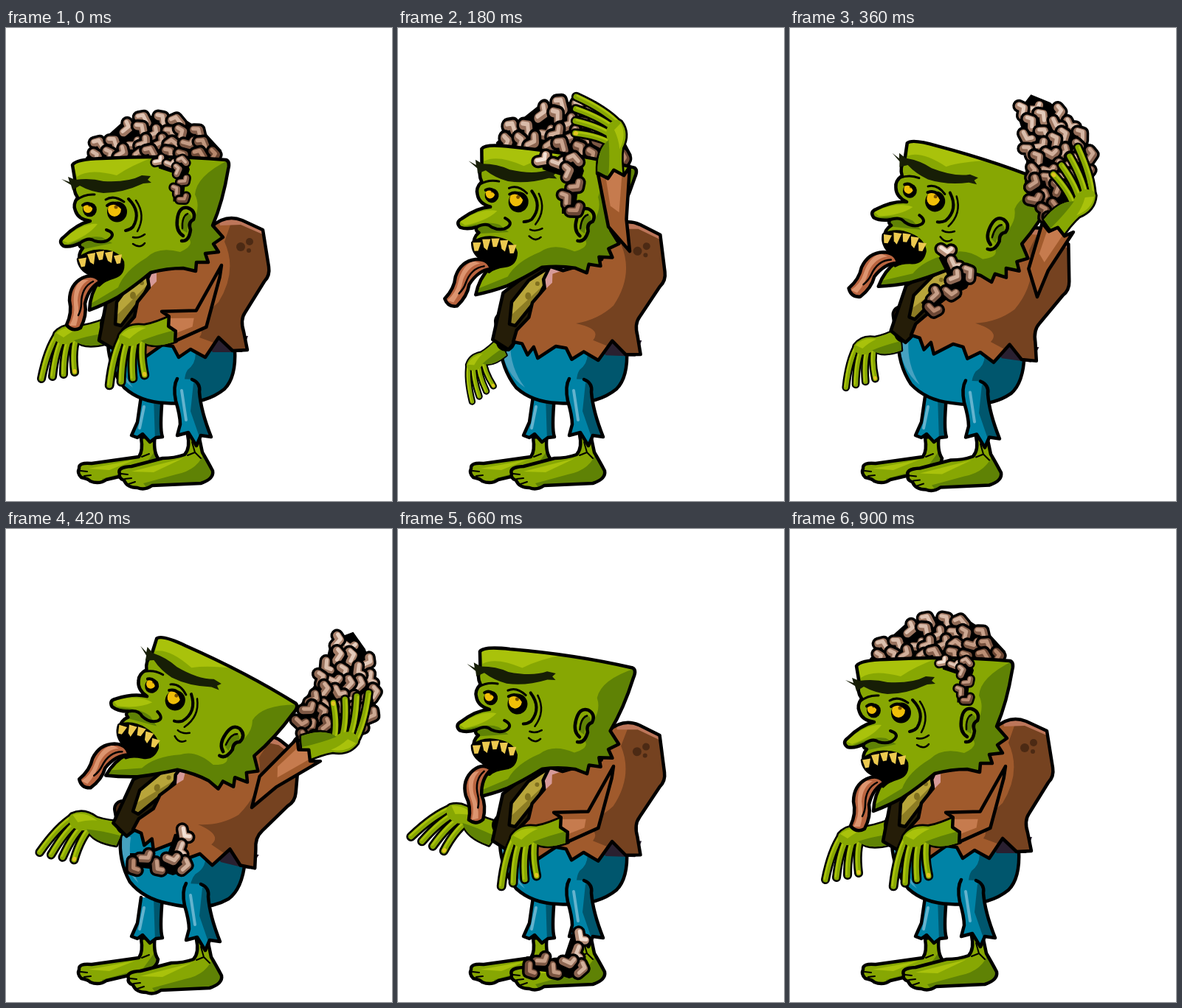
An HTML page with a canvas that plays this animation: 523x642 px, repeating every 960 ms.

```html
<!DOCTYPE html>
<html lang="en">
<head>
<meta charset="utf-8">
<title>Zombie</title>
<style>
html, body { margin: 0; width: 100%; height: 100%; overflow: hidden; background: #fff; }
canvas { display: block; }
</style>
</head>
<body>
<canvas id="stage" width="523" height="642"></canvas>
<script>
const c = document.getElementById('stage').getContext('2d');
const STEP = 60, POSES = 16;
const INK = '#000', SKIN = '#87a703', LIGHT = '#a9c20b', SHADE = '#5f8205';
const BROWN = '#a05a2c', DARK_BROWN = '#754220', BLUE = '#0083a6', DARK_BLUE = '#00566d';

const mix = (a, b, t) => a + (b - a) * t;
const mixPoint = (p, q, t) => p.map((v, i) => mix(v, q[i], t));

// Smooth rise from 0 to 1 between two poses.
function ramp(t, from, to) {
  const f = Math.min(1, Math.max(0, (t - from) / (to - from)));
  return f * f * (3 - 2 * f);
}

function place([x, y, deg = 0, scale = 1], px, py, draw) {
  c.save();
  c.translate(x, y);
  c.rotate(deg * Math.PI / 180);
  c.scale(scale, scale);
  c.translate(-px, -py);
  draw();
  c.restore();
}

function fill(d, color) {
  c.fillStyle = color;
  c.fill(new Path2D(d));
}

function line(d, width = 3, color = INK) {
  c.lineWidth = width;
  c.strokeStyle = color;
  c.stroke(new Path2D(d));
}

function dot(x, y, rx, ry, color) {
  c.fillStyle = color;
  c.beginPath();
  c.ellipse(x, y, rx, ry, 0, 0, 7);
  c.fill();
}

function part(d, color, ...shades) {
  fill(d, color);
  c.save();
  c.clip(new Path2D(d));
  for (const [tone, area] of shades) fill(area, tone);
  c.restore();
  line(d, 4.5);
}

// Brain tissue: jittered folds that fill a silhouette.
function makeBrain(d, [left, top, right, bottom], seed) {
  const path = new Path2D(d), folds = [];
  const rnd = () => (seed = (seed * 16807) % 2147483647) / 2147483647;
  for (let y = top, row = 0; y <= bottom; y += 16, row++) {
    for (let x = left + (row % 2) * 10; x <= right; x += 20) {
      const fx = x + rnd() * 8 - 4, fy = y + rnd() * 8 - 4, angle = rnd() * 3.1;
      const depth = (fx - left) / (right - left) * .6 + (fy - top) / (bottom - top) * .4;
      if (c.isPointInPath(path, fx, fy)) folds.push({ fx, fy, angle, depth });
    }
  }
  return { path, folds };
}

function drawBrain({ path, folds }) {
  const tone = (from, to, t) => `rgb(${mixPoint(from, to, t)})`;
  c.fillStyle = INK;
  c.fill(path);
  const fold = 'M-7 2L-2 -3L7 2';
  for (const { fx, fy, angle, depth } of folds) {
    place([fx, fy, angle * 57], 0, 0, () => {
      line(fold, 18);
      line(fold, 11, tone([178, 138, 116], [98, 62, 44], depth));
    });
    place([fx - 1, fy - 1.5, angle * 57], 0, 0, () =>
      line(fold, 5, tone([238, 218, 205], [176, 126, 98], depth)));
  }
}

const pile = makeBrain('M108 176L126 156L155 130L195 119L238 121L270 142L292 166L292 184L110 184Z', [110, 124, 294, 182], 41);
const chunk = makeBrain('M158 66L185 57L240 57L282 74L288 110L295 182L268 180L230 162L200 122L160 98Z', [162, 62, 296, 182], 77);
const scrap = makeBrain('M-46 -10L6 -10L12 8L4 32L0 66L-18 66L-18 40L-8 18L-44 6Z', [-40, -5, 10, 62], 9);

function hand() {
  const palm = 'M6 -13Q-18 -4 -32 -3Q-52 -8 -64 6Q-68 14 -58 20Q-46 24 -36 16Q-24 28 6 20Z';
  line(palm, 5);
  for (let i = 0; i < 4; i++) {
    const root = -60 + i * 9, tip = -82 + i * 15;
    const finger = `M${root} 8Q${root - 14 + i * 2} 28 ${tip} ${68 - i * 3}`;
    line(finger, 12);
    line(finger, 7, SKIN);
    place([-1.5, -1], 0, 0, () => line(finger, 2.5, LIGHT));
  }
  fill(palm, SKIN);
  fill('M6 6Q-20 10 -38 16Q-24 28 6 20Z', SHADE);
  fill('M-62 6Q-50 -5 -30 0Q-42 4 -52 12Z', LIGHT);
  dot(-37, 58, 2.5, 3, '#e3c422');
}

function toes(x, y, count) {
  for (let i = 0; i < count; i++) line(`M${x + i * 5} ${y + i * 7}l9 ${1 - i * 2}`, 2);
}

function backLeg() {
  part('M183 556Q186 574 180 582L116 591Q98 589 99 598Q96 604 102 610Q112 612 114 615Q126 620 136 613L166 606Q204 602 206 584Q199 574 202 552Z', SKIN,
    [LIGHT, 'M175 586L112 598L140 600Z'], [SHADE, 'M205 570L186 596L130 612L140 624L212 605Z']);
  toes(101, 601, 2);
  line('M184 582L194 578', 2);
  part('M183 500L178 535L170 553L178 556L185 551L195 562L203 556L212 555Q208 545 212 500', BLUE,
    [DARK_BLUE, 'M200 500L216 500L216 562L202 560Z']);
  line('M187 514L181 543', 4, '#63b3ce');
}

function frontLeg() {
  part('M246 552Q250 570 242 579Q228 584 212 584L170 595Q150 596 154 605Q152 611 160 614Q164 624 178 624Q188 628 198 621L264 618Q282 612 280 601Q272 586 266 576L261 552Z', SKIN,
    [LIGHT, 'M240 584L170 602L200 603Z'], [SHADE, 'M270 572Q262 600 230 606L186 618L200 636L290 620Z']);
  toes(156, 605, 3);
  line('M246 580L256 576L264 584M256 576L252 562', 2);
  part('M232 476Q226 486 230 506Q236 526 236 538L232 553L247 549L258 567L264 553L278 555Q264 520 262 494Q264 482 252 477', BLUE,
    [DARK_BLUE, 'M254 482L250 520L262 555L284 560L264 480Z']);
  line('M238 492L244 532', 4, '#63b3ce');
}

function pelvis() {
  part('M138 428L166 396L300 420L310 436Q312 474 296 490Q268 513 216 509Q182 508 160 488Q140 462 138 428Z', BLUE,
    [DARK_BLUE, 'M254 430Q262 452 246 464Q236 480 250 515L330 500L320 425Z'],
    ['#46a1c0', 'M140 428L152 428Q152 462 172 488Q145 470 138 428Z']);
}

function torso() {
  fill('M262 420L328 418L320 440L280 440Z', '#2a2030');
  part('M138 360L196 312L216 326L176 400L148 437L126 424Z', '#251d08');
  part('M198 324L172 342L150 372L148 402L156 404L186 364L204 326Z', '#b8a53a',
    ['#8c7c24', 'M150 390L190 350L204 326L200 380L150 410Z']);
  dot(172, 363, 4, 5, '#81711f');
  dot(184, 346, 3, 3, '#81711f');
  part('M200 322L218 327L270 310L278 270Q298 252 320 261L348 274L356 324Q358 336 350 344L324 386Q317 396 322 412L327 437L307 438L288 420L270 447L250 436L234 447L226 432L212 430L188 447L182 432L174 443L166 428L154 426L158 410L174 392L178 372L194 352L192 340Z', BROWN,
    [DARK_BROWN, 'M310 250L296 290Q314 330 288 372Q268 392 238 398Q274 404 262 420L330 445L375 340L350 260Z'],
    ['#bd765a', 'M288 258L320 260L350 275L350 281L318 267L290 268Z'],
    ['#d69a98', 'M196 352L194 338L200 320L220 326L204 332L204 344Z']);
  for (const [x, y, r] of [[318, 297, 6], [330, 290, 5], [329, 302, 3]]) dot(x, y, r, r, '#4c2a14');
}

function eye(x, y, r) {
  dot(x + r * .35, y + r * .35, r * 1.35, r * 1.4, INK);
  dot(x, y, r * .9, r, '#f0be08');
  dot(x + 2, y - 3, r * .25, r * .25, '#7a5200');
  line(`M${x - r} ${y - r * .5}Q${x} ${y - r * 1.3} ${x + r} ${y - r * .2}`, 4);
}

function face(tongueTurn) {
  part('M90 186Q94 178 130 177Q220 172 298 179Q304 181 301 192Q294 235 280 268L294 284L281 293L288 304L270 306L274 318L258 318L257 330L240 326Q218 326 196 332Q172 352 152 365Q134 375 113 383Q114 360 126 344L100 320Q97 306 104 299Q98 297 100 292Q88 298 78 296Q70 290 78 284Q96 266 114 262Q98 260 94 248Q90 240 97 230Q90 220 94 210Z', SKIN,
    [LIGHT, 'M90 180L204 174Q170 186 150 200Q112 190 96 202ZM76 288Q104 264 124 266Q112 282 84 292Z'],
    [SHADE, 'M304 178Q258 200 256 226Q268 250 240 280Q262 292 236 304Q206 296 190 312Q160 330 152 352L112 376L120 390L300 335ZM80 296Q112 280 130 284L144 292L106 300Z']);
  fill('M75 205L86 209L84 202L94 206Q114 203 132 208Q165 210 184 200L196 201L192 206L197 210L186 211Q158 224 132 224Q114 222 100 214L90 220L88 213Z', '#171e06');
  eye(111, 244, 7);
  eye(147, 246, 10);
  line('M95 234Q106 225 120 226M135 233Q146 226 160 236', 3);
  line('M166 232Q184 250 172 270Q168 274 162 275', 4);
  line('M176 234Q190 254 178 276M172 284Q180 286 188 280M172 293Q182 300 188 292', 2.5);
  line('M100 292Q112 283 120 289Q134 293 142 285Q148 278 136 274', 4);
  part('M98 314Q112 301 132 303Q152 304 158 318Q160 334 146 338Q132 342 126 349Q122 336 114 334Q100 328 98 314Z', INK);
  for (let i = 0; i < 5; i++) {
    const x = 104 + i * 12, y = 302 + (i - 2.3) ** 2 * 1.8;
    fill(`M${x - 6} ${y + 2}L${x + 5} ${y}L${x + 3} ${y + 12 + i % 2 * 4}L${x - 2} ${y + 13}Z`, '#ecc94f');
  }
  part('M240 282Q230 276 232 260Q234 242 246 244Q258 248 254 260Q246 264 250 274Q248 290 238 289', SKIN,
    [SHADE, 'M242 252Q252 250 252 260Q244 268 246 278L238 274Z']);
  line('M239 272Q238 256 246 252', 2.5);
  place([124, 344, tongueTurn], 124, 344, () => {
    part('M128 344Q120 332 104 339Q86 348 86 370Q90 386 82 403Q90 413 101 407Q110 390 107 374Q112 352 128 344Z', '#b9643f',
      ['#dd9570', 'M102 342Q90 352 92 376Q94 390 86 404L95 404Q100 388 97 370Q98 350 112 342Z']);
    line('M118 344Q102 352 102 374Q102 382 98 390', 2.5);
  });
}

// Torn sleeve from shoulder over elbow to a ragged cuff.
function sleeve(shoulder, elbow, wrist) {
  const dx = wrist[0] - elbow[0], dy = wrist[1] - elbow[1], length = Math.hypot(dx, dy);
  const at = (t, side) => [elbow[0] + dx * t - dy / length * side, elbow[1] + dy * t + dx / length * side];
  const cuff = [22, 12, 0, -10, -22].map((side, i) => at(i % 2 ? .94 : 1.03, side));
  const back = at(.35, -22);
  const outline = 'M' + [shoulder, at(.4, 4), ...cuff, back, mixPoint(shoulder, elbow, .3)].join('L') + 'Z';
  part(outline, BROWN, ['#c67b4e', `M${at(.5, -4)}L${at(1.1, 14)}L${at(1.1, -12)}L${at(.6, -14)}Z`]);
}

function draw(pose) {
  const rise = ramp(pose, 0, 3) - ramp(pose, 9, 11);
  const swing = ramp(pose, 5, 7) - ramp(pose, 7, 9);
  const lean = ramp(pose, 5, 7) - ramp(pose, 9, 11);
  const lift = ramp(pose, 0, 3) - ramp(pose, 10, 15);
  const drop = ramp(pose, 0, 3) - ramp(pose, 5, 7);
  const grope = ramp(pose, 5, 9) - ramp(pose, 9, 15);
  const reach = ramp(pose, 3, 5);

  const body = [155 + 2 * lift + 15 * lean, 430 - 18 * lean, 2 * lift + 12 * lean];
  const head = [90 + 24 * lift + 92 * lean, 182 - 22 * lift - 15 * lean, 9 * lift + 18 * lean];
  const farWrist = [130 + 6 * drop + 22 * lean, 408 + 24 * drop, 47 * grope - 25 * drop, 1 - .22 * drop + .08 * grope];

  const joint = (down, up, back) => {
    const raised = [up[0] + 16 * reach + 14 * lean, up[1] + 98 * lean];
    return mixPoint(mixPoint(down, raised, rise), back, swing);
  };
  const elbow = joint([284, 376], [314, 303], [333, 378]);
  const wrist = joint([222, 404], [293, 196], [408, 302]);
  const shoulder = mixPoint([292, 322], elbow, rise);
  const raise = rise + swing;
  const turn = -5 + 125.5 * raise - 17.5 * raise ** 2;

  c.fillStyle = '#fff';
  c.fillRect(0, 0, 523, 642);
  c.lineJoin = c.lineCap = 'round';

  backLeg();
  place([138 + 17 * lean, 430 - 12 * lean, 9 * lean], 138, 430, pelvis);
  place([12 * swing, 5 * swing], 0, 0, frontLeg);

  place(farWrist, 0, 0, hand);
  const farSleeve = `M${body[0] - 14} ${body[1] - 32}L${farWrist[0] + 10} ${farWrist[1] - 6}`;
  line(farSleeve, 26);
  line(farSleeve, 18, '#4a2811');

  place(body, 155, 430, torso);
  place(head, 90, 182, () => {
    if (pose < 4) {
      c.save();
      c.translate(0, 184);
      c.scale(1, 1 + .22 * lift);
      c.translate(0, -184);
      drawBrain(pile);
      c.restore();
    }
    face(10 * rise - 22 * (ramp(pose, 5, 9) - ramp(pose, 11, 15)));
  });

  // A loose piece slides off the head and drops to the foot.
  const fall = Math.min(412, 17 * Math.max(0, pose - 3) ** 2);
  place([240 - 6 * lean, 186 + fall, 90 * ramp(pose, 5, 7), .75 + .25 * ramp(pose, 0, 3)], 0, 0, () => drawBrain(scrap));

  if (pose > 3 && pose < 10) {
    const grip = 112 - 26 * lean, angle = (turn + 116) * Math.PI / 180, slide = ramp(pose, 7, 9);
    const x = wrist[0] + grip * Math.cos(angle) - 72 * slide;
    const y = wrist[1] + grip * Math.sin(angle) - 12 * slide;
    place([x, y, turn - 103], 228, 119, () => drawBrain(chunk));
  }
  place([...wrist, turn, 1.08], 0, 0, hand);
  sleeve(shoulder, elbow, wrist);
}

let shown = -1;
function tick() {
  const pose = Math.floor(performance.now() / STEP) % POSES;
  if (pose !== shown) draw((shown = pose) % (POSES - 1));
  requestAnimationFrame(tick);
}
tick();
</script>
</body>
</html>
```
